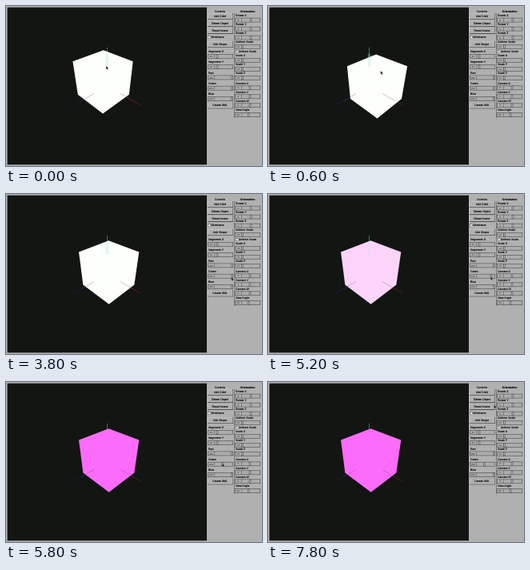
Animation of 320 by 200 pixels, one loop 8000 ms. Source, as an HTML page:

```html
<!DOCTYPE html>
<html lang="en">
<head>
<meta charset="utf-8">
<title>Cube editor</title>
<style>
html, body { margin: 0; width: 100%; height: 100%; overflow: hidden; background: #b0b0b0; }
svg { display: block; width: 320px; height: 200px; }
text { font: 3.5px "Liberation Sans", Arial, sans-serif; fill: #000; stroke: #000; stroke-width: .12px; text-rendering: geometricPrecision; }
.mid { text-anchor: middle; }
.value { font-size: 2.9px; fill: #222; stroke: none; }
</style>
</head>
<body>
<svg id="stage" viewBox="0 0 320 200">
  <rect width="320" height="200" fill="#b0b0b0"/>
  <rect x="1.7" y="1.7" width="249.3" height="196.6" fill="#121512"/>
  <g id="axes" fill="none" stroke-width=".9"></g>
  <polygon id="cube"/>
  <g id="inner" fill="none"></g>
  <g id="panel"></g>
  <path id="cursor" d="M0 0V4.4L1.1 3.5 1.8 5 2.5 4.6 1.9 3.2H3.1Z" fill="#080808" stroke="#e8e8e8" stroke-width=".25"/>
</svg>
<script>
const $ = id => document.getElementById(id);

function add(parent, tag, attrs, content = '') {
  const el = document.createElementNS('http://www.w3.org/2000/svg', tag);
  for (const key in attrs) el.setAttribute(key, attrs[key]);
  el.textContent = content;
  $(parent).append(el);
  return el;
}

// Panel

const box = (x, y, width, height, fill) => add('panel', 'rect', { x, y, width, height, fill });
const label = (x, y, content, cls = '') => add('panel', 'text', { x, y, class: cls }, content);

function button(y, content) {
  box(252, y, 32, 8, '#404040');
  box(252, y, 31.3, 7.2, '#c8c8c8');
  box(252.6, y + .6, 30.7, 6.6, '#b0b0b0');
  label(267.5, y + 5.1, content, 'mid');
}

function check(x, y, content) {
  box(x, y - 1.6, 3, 3, '#505050');
  box(x + .6, y - 1, 2.2, 2.2, '#f4f4f4');
  label(x + 3.8, y + 1.2, content);
}

function slider(x, y, name, value, knobX) {
  label(x + 1, y - 1.9, name);
  box(x, y, 32, 5.6, '#505050');
  box(x + .6, y + .6, 30.8, 4.4, '#acacac');
  box(x + 8, y, .6, 5.2, '#606060');
  const text = label(x + 4.2, y + 3.9, value, 'value mid');
  const knob = add('panel', 'path', { d: `M-.9 ${y + .7}h1.8v4.2h-1.8z`, fill: '#c4c4c4', stroke: '#333', 'stroke-width': .5 });
  const move = px => knob.setAttribute('transform', `translate(${px})`);
  move(knobX);
  return { text, move };
}

box(285, 9, .7, 131, '#606060');
label(267.5, 7.8, 'Controls', 'mid');
label(302, 7.8, 'Orientation', 'mid').style.fontWeight = 'bold';
['Add Child', 'Delete Object', 'Reset Scene'].forEach((name, i) => button(9 + 8.9 * i, name));
check(252.5, 39, 'Wireframe');
button(44, 'Add Shape');
const [, , , green] = ['Segments X', 'Segments Y', 'Red', 'Green', 'Blue'].map((name, i) =>
  slider(252, 60 + 13.3 * i, name, i < 2 ? 30 : 255, i < 2 ? 264 : 282.5));
button(120.3, 'Create XML');

for (let i = 0; i < 3; i++) {
  slider(286, 14.8 + 11 * i, 'Rotate ' + 'XYZ'[i], '0', 306);
  slider(286, 65 + 11 * i, 'Scale ' + 'XYZ'[i], '1.0', 295.5);
  slider(286, 99.5 + 11 * i, 'Camera ' + 'UVW'[i], '0', 305);
}
slider(286, 48, 'Uniform Scale', '1.0', 295.5);
check(287, 57, 'Uniform Scale');
slider(286, 133.2, 'View Angle', '60', 303);

// Scene: an isometric camera with perspective, one unit away from the origin

const focal = 175.3, half = .1395, axisLength = .282;

function project(x, y, z, [dx, dy] = [0, 0]) {
  const across = (x - z) / Math.SQRT2;
  const up = (2 * y - x - z) / Math.sqrt(6);
  const depth = 1 - (x + y + z) / Math.sqrt(3);
  return [126.5 + (focal * across + dx) / depth, 100 + (dy - focal * up) / depth];
}

// The six corners of the outline, in order around it
const corners = ['-+-', '++-', '+--', '+-+', '--+', '-++'];
const outline = ['-++', '-+-', '++-', '+--', '+-+', '--+']
  .map(signs => [...signs].map(sign => sign + half * 1).map(Number));

function axis(parent, unit, from, to, attrs) {
  const end = k => project(...unit.map(u => u * axisLength * k));
  return add(parent, 'path', { d: `M${end(from)}L${end(to)}`, ...attrs });
}

const [xAxis, yAxis, zAxis] = [[1, 0, 0], [0, 1, 0], [0, 0, 1]];
axis('axes', xAxis, .4, 1, { stroke: '#651a1c' });
axis('axes', yAxis, .5, 1, { stroke: '#1f8a68' });
axis('axes', zAxis, .4, 1, { stroke: '#1b1b50' });
axis('inner', xAxis, .44, .8, { stroke: 'rgb(70 80 90 / .4)', 'stroke-width': .8 });
axis('inner', zAxis, .44, .8, { stroke: 'rgb(70 80 90 / .4)', 'stroke-width': .8 });
const glow = [1, 4].map(width =>
  axis('inner', yAxis, .56, .86, { stroke: '#a4e6de', 'stroke-width': width }));

// Motion

function ramp(t, start, end) {
  const k = Math.min(1, Math.max(0, (t - start) / (end - start)));
  return 1 - (1 - k) ** 1.2;
}

// Each move is [start, end, x, y].
const travel = (t, from, moves) => moves.reduce((p, [start, end, ...to]) =>
  p.map((v, i) => v + (to[i] - v) * ramp(t, start, end)), from);

function draw(now) {
  const t = Math.floor(now % 8000 / 200) * 200;
  const offset = travel(t, [-5, -8.3], [[0, 600, 9.2, -2.7], [600, 1000, 2, -5.3]]);
  const grip = [130.6 + offset[0] * 1.1, 84 + offset[1] * 1.1];
  const pointer = travel(t, grip, [
    [1400, 2200, 267.7, 16.3], [3000, 3800, 281.7, 104],
    [5000, 5800, 270.3, 101.8], [6200, 7800, 282.5, 28.5]
  ]);
  const level = Math.round(255 - 147 * ramp(t, 5000, 5800));

  $('cube').setAttribute('points', outline.map(p => project(...p, offset)).join(' '));
  $('cube').setAttribute('fill', `rgb(252 ${level} 250)`);
  glow.forEach(line => line.setAttribute('stroke-opacity', .25 * (level - 108) / 147));
  $('cursor').setAttribute('transform', `translate(${pointer})`);
  green.text.textContent = level;
  green.move(282.5 - (255 - level) * .082);
}

const start = performance.now();
function tick() {
  draw(performance.now() - start);
  requestAnimationFrame(tick);
}
tick();
</script>
</body>
</html>
```
